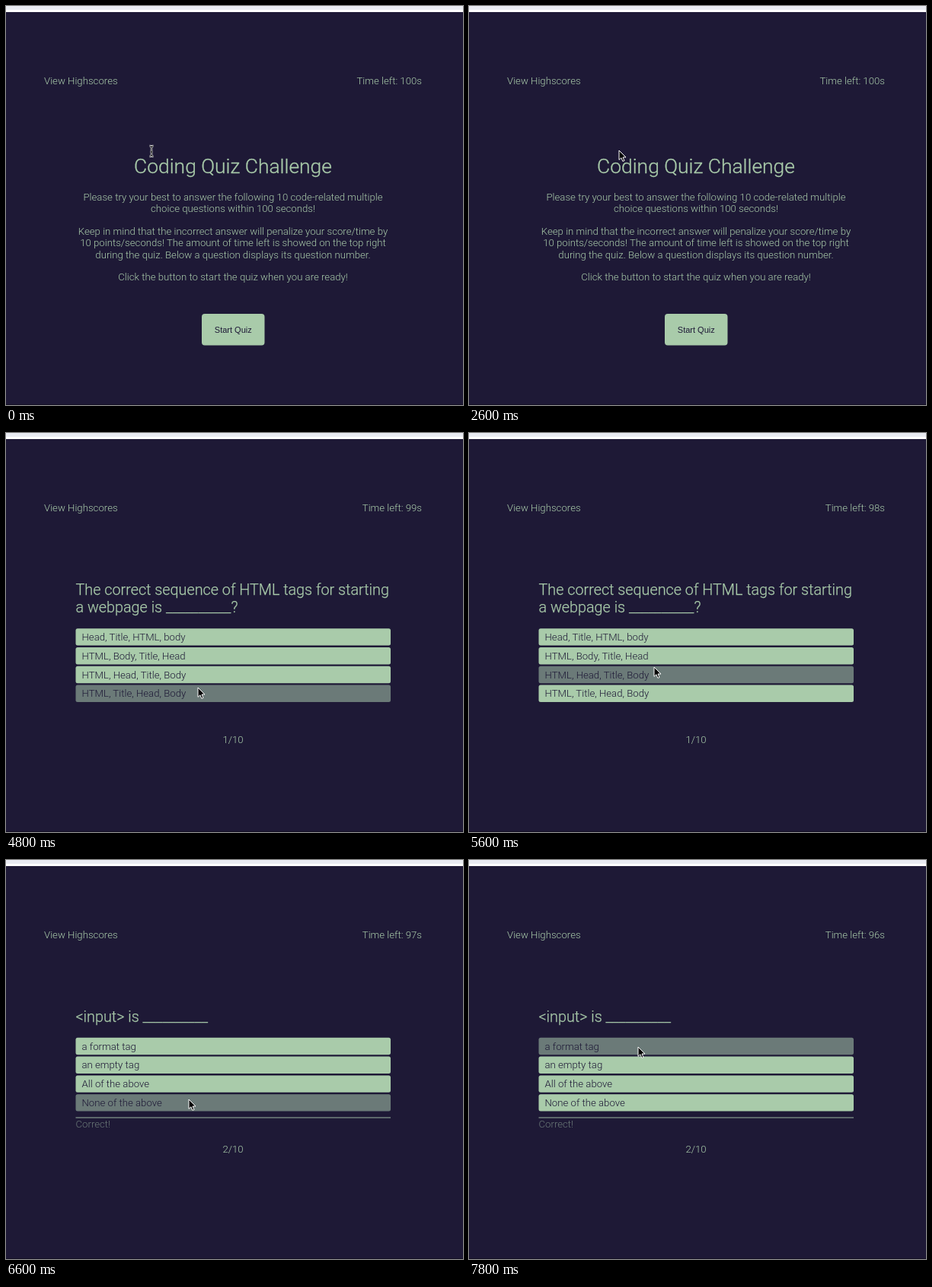
Animation, 600 px wide and 525 px high, one loop 8000 ms. Source, as an HTML page:

```html
<!DOCTYPE html>
<html lang="en">
<head>
<meta charset="utf-8">
<title>Coding quiz</title>
<style>
  html, body { margin: 0; width: 100%; height: 100%; overflow: hidden; background: #1e1936; }
  svg { display: block; width: 100vw; height: 100vh; }
  text { font-family: Roboto, sans-serif; font-weight: 300; font-size: 13.2px; fill: #a9cbaa; white-space: pre; }
  .h1 { font-size: 26.4px; stroke: #a9cbaa; stroke-width: .3px; }
  .h2 { font-size: 19.8px; stroke: #a9cbaa; stroke-width: .25px; }
  .row { font-size: 19.8px; }
  .ui { font: 11px "Liberation Sans", Arial, sans-serif; }
  .dark { fill: #1e1936; }
  .dim { fill: #6b7a78; }
  .box { fill: #a9cbaa; }
</style>
</head>
<body>
<svg id="stage" viewBox="0 0 600 525"></svg>
<script>
const LOOP = 8000, STEP = 200;
const stage = document.getElementById('stage');

const esc = s => s.replace(/</g, '&lt;').replace(/>/g, '&gt;');
const text = (x, y, s, cls = '', anchor = 'start') =>
  `<text x="${x}" y="${y}" class="${cls}" text-anchor="${anchor}">${esc(s)}</text>`;
const mid = (y, s, cls) => text(298, y, s, cls, 'middle');
const box = (x, y, w, h, r = 0, cls = 'box') =>
  `<rect x="${x}" y="${y}" width="${w}" height="${h}" rx="${r}" class="${cls}"/>`;
const button = (x, y, w, h, label) =>
  box(x, y, w, h, 4) + text(x + w / 2, y + h / 2 + 4, label, 'ui dark', 'middle');

const trophy = `
  <g transform="translate(385 211)">
    <path d="M-8-10C-15-12-13 0-5 1M8-10C15-12 13 0 5 1" fill="none" stroke="#e39a1c" stroke-width="1.8"/>
    <path d="M-8.5-13H8.5C8.5-3 6 3 1.6 5V8H-1.6V5C-6 3-8.5-3-8.5-13Z" fill="#f0a51f"/>
    <path d="M-5-11C-5-4-4 0-1.5 3" fill="none" stroke="#ffdc6a" stroke-width="2"/>
    <path d="M5-11C5-4 4 0 2 3" fill="none" stroke="#b96a0d" stroke-width="2"/>
    <ellipse cy="-13" rx="8.5" ry="1.4" fill="#c57a12"/>
    <path d="M-3 7H3L5 10H-5Z" fill="#d88c18"/>
    <path d="M-6 9H6L7 13.5H-7Z" fill="#6b3a18"/>
    <rect x="-3" y="10" width="6" height="2" fill="#e9b443"/>
  </g>`;

function startPage() {
  return mid(219.5, 'Coding Quiz Challenge', 'h1') +
    mid(255.5, 'Please try your best to answer the following 10 code-related multiple') +
    mid(271, 'choice questions within 100 seconds!') +
    mid(300.5, 'Keep in mind that the incorrect answer will penalize your score/time by') +
    mid(316, '10 points/seconds! The amount of time left is showed on the top right') +
    mid(331.5, 'during the quiz. Below a question displays its question number.') +
    mid(360.5, 'Click the button to start the quiz when you are ready!') +
    button(257, 405, 82.5, 41.5, 'Start Quiz');
}

function scorePage() {
  const scores = [['QT', 76], ['OR', 74], ['WM', 42], ['TT', 0]];
  const rows = scores.map(([who, n], i) => {
    const y = 246.5 + i * 24.8, cls = i % 2 ? 'row' : 'row dark';
    return (i % 2 ? '' : box(174.5, y, 248, 24.8)) +
      text(182.5, y + 19.5, `${i + 1} ${who}`, cls) +
      text(413.5, y + 19.5, String(n), cls, 'end');
  });
  return button(50.5, 91, 124, 20.5, 'Go Back') +
    button(422.5, 91, 124, 20.5, 'Clear Highscores') +
    text(198, 221.5, 'HIGH SCORES', 'h1') + trophy + rows.join('');
}

function quizPage(lines, options, count, hover, note) {
  const top = 233.8 + (lines.length - 1) * 23.4;
  const end = top + 4 * 24.8;
  return lines.map((s, i) => text(91.5, 213 + i * 23.4, s, 'h2')).join('') +
    options.map((s, i) => {
      const y = top + i * 24.8;
      return box(91.5, y, 413.5, 22.4, 2.5, i === hover ? 'dim' : 'box') +
        text(99.5, y + 15.8, s, 'dark');
    }).join('') +
    (note ? box(91.5, 338.2, 413.5, 1.6, 0, 'dim') + text(91.5, 352.3, note, 'dim') : '') +
    mid(end + 51.5, count);
}

const quiz = [
  [['The correct sequence of HTML tags for starting', 'a webpage is __________?'],
   ['Head, Title, HTML, body', 'HTML, Body, Title, Head', 'HTML, Head, Title, Body', 'HTML, Title, Head, Body'], '1/10'],
  [['<input> is __________'],
   ['a format tag', 'an empty tag', 'All of the above', 'None of the above'], '2/10', 'Correct!']
];

// Pointer keys: time, x, y
const path = [
  [0, 191, 191], [200, 168, 160], [400, 122, 112], [600, 106, 99], [1000, 104, 101],
  [2000, 105, 102], [2400, 112, 115], [2600, 197, 190], [3000, 285, 385], [3200, 297, 418],
  [3600, 298, 420], [4000, 292, 400], [4400, 262, 350], [4800, 252, 335], [5200, 249, 322],
  [5600, 243, 308], [6000, 240, 301], [6400, 240, 315], [6600, 240, 315], [7000, 236, 301],
  [7200, 232, 290], [7400, 227, 272], [7800, 222, 246]
];

function pointerAt(t) {
  const i = path.findLastIndex(k => k[0] <= t);
  const a = path[i], b = path[i + 1] || a;
  const u = b === a ? 0 : (t - a[0]) / (b[0] - a[0]);
  return [a[1] + (b[1] - a[1]) * u, a[2] + (b[2] - a[2]) * u];
}

function pointer(x, y, beam) {
  const bar = 'M-2.5-7Q0-7 0-5V5Q0 7-2.5 7M2.5-7Q0-7 0-5M0 5Q0 7 2.5 7M-1.5 1H1.5';
  const shape = beam
    ? `<path d="${bar}" fill="none" stroke="#fff" stroke-width="2.4"/><path d="${bar}" fill="none" stroke="#000" stroke-width="1"/>`
    : '<path d="M0 0V12.4L2.9 9.8L4.9 14.4L7 13.5L5 9H9Z" fill="#000" stroke="#fff" stroke-width="1"/>';
  return `<g transform="translate(${x} ${y})">${shape}</g>`;
}

function page(t, y) {
  if (t >= 800 && t < 2000) return scorePage();
  const left = t < 4400 ? 100 : 99 - Math.floor((t - 4400) / 1000);
  const bar = text(50, 103.3, 'View Highscores') + text(546, 103.3, `Time left: ${left}s`, '', 'end');
  if (t < 3400) return bar + startPage();
  const [lines, options, count, note] = quiz[t < 6400 ? 0 : 1];
  const first = lines.length > 1 ? 257.2 : 233.8;
  return bar + quizPage(lines, options, count, Math.floor((y - first) / 24.8), note);
}

let shown = -1;
function draw(now) {
  const t = Math.floor(now % LOOP / STEP) * STEP;
  if (t !== shown) {
    shown = t;
    const [x, y] = pointerAt(t);
    const beam = t === 0 || t === 2800;
    stage.innerHTML = '<rect width="600" height="525" fill="#1e1936"/>' +
      '<rect width="600" height="8" fill="#fff"/><rect width="600" height="5" fill="#e9ebf2"/>' +
      '<rect y="524" width="600" height="1" fill="#120f22"/>' +
      page(t, y) + pointer(x, y, beam);
  }
}

const begin = performance.now();
function tick() {
  draw(performance.now() - begin);
  requestAnimationFrame(tick);
}
tick();
</script>
</body>
</html>
```
